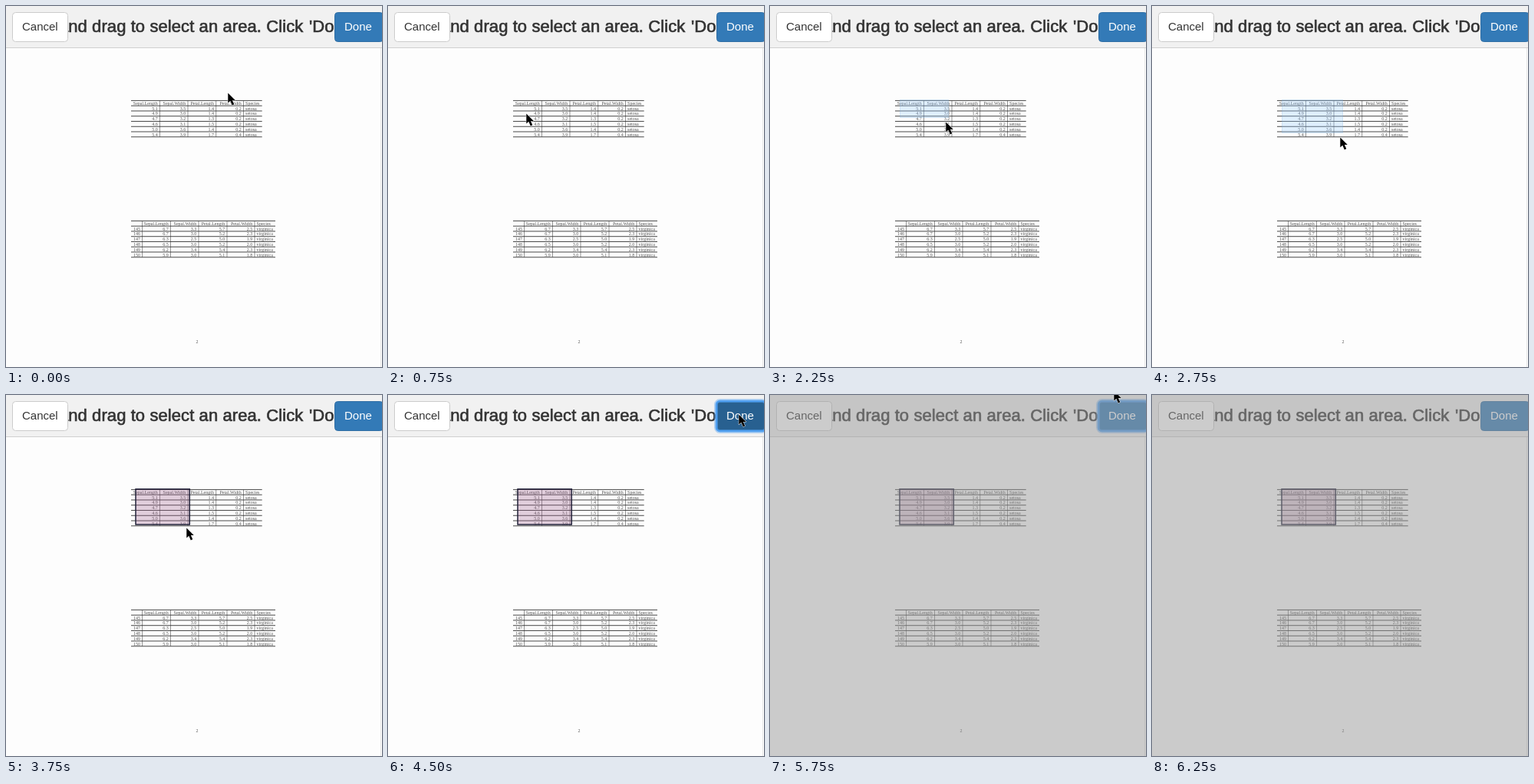
These frames come from a looping animation (490x471 px, 6.5 s). An HTML page:

```html
<!DOCTYPE html>
<html lang="en">
<head>
<meta charset="utf-8">
<title>Select an area</title>
<style>
  html, body { margin: 0; width: 100%; height: 100%; overflow: hidden; background: #fdfdfd; }
  svg { display: block; width: 490px; height: 471px; }
  text { font-family: "Liberation Sans", Arial, sans-serif; white-space: pre; }
  .title { font-size: 22px; letter-spacing: .09px; fill: #333; stroke: #333; stroke-width: .65px; }
  .label { font-size: 15px; }
  .table text, .page { font: 6px "Liberation Serif", Times, serif; fill: #555; }
  .table .rows { stroke: #333; stroke-width: .9; }
  .table .cols { stroke: #777; stroke-width: .8; }
  .drag { fill: #9cf; fill-opacity: .3; stroke: #6fa8d8; stroke-opacity: .25; }
  .picked { fill: #a06090; fill-opacity: .3; stroke: #22223a; stroke-width: 1.5; }
</style>
</head>
<body>
<svg id="stage" viewBox="0 0 490 471">
  <rect width="490" height="471" fill="#fdfdfd"/>
  <path d="M488.5 55V471" stroke="#e8e8e8"/>
  <g id="tables"></g>
  <text class="page" x="247.5" y="440">2</text>
  <rect id="area"/>

  <rect width="490" height="54" fill="#f1f1f1"/>
  <path d="M0 54.5H490" stroke="#d0d0d0"/>
  <text class="title" x="68.9" y="34">and drag to select an area. Click <tspan dx="1.3">'Done'</tspan></text>

  <rect x="8.5" y="8.5" width="72" height="38" rx="4" fill="#fff" stroke="#ccc"/>
  <text class="label" x="21" y="32" fill="#333">Cancel</text>

  <rect id="done" x="428.5" y="8.5" width="63" height="38" rx="4"/>
  <g id="glow" fill="none" stroke="#4f9ff0">
    <rect x="427.5" y="7.5" width="65" height="40" rx="5" stroke-width="5" opacity=".4"/>
    <rect x="428" y="8" width="64" height="39" rx="4.5" stroke-width="2.5"/>
  </g>
  <text class="label" x="441" y="32" fill="#fff">Done</text>

  <rect id="shade" width="490" height="471" fill="#999" opacity=".5"/>
  <g id="cursor">
    <path d="M.3 1.5V14.6L3.3 11.8L5.8 17.4L8.3 16.3L5.9 10.9H9.8Z"
          stroke="#fff" stroke-width="1" paint-order="stroke" stroke-linejoin="round"/>
  </g>
</svg>
<script>
const $ = id => document.getElementById(id);
const LOOP = 6500, STEP = 250;

const heads = ["Sepal.Length", "Sepal.Width", "Petal.Length", "Petal.Width"];
const setosa = ["5.1 3.5 1.4 0.2", "4.9 3.0 1.4 0.2", "4.7 3.2 1.3 0.2",
                "4.6 3.1 1.5 0.2", "5.0 3.6 1.4 0.2", "5.4 3.9 1.7 0.4"];
const virginica = ["6.7 3.3 5.7 2.5", "6.7 3.0 5.2 2.3", "6.3 2.5 5.0 1.9",
                   "6.5 3.0 5.2 2.0", "6.2 3.4 5.4 2.3", "5.9 3.0 5.1 1.8"];

function table(top, right, cols, species, data, firstId) {
  const pitch = 6.77, bottom = top + 7 * pitch;
  const cell = (x, row, s, anchor) =>
    `<text x="${x}" y="${top + row * pitch + 5.5}" text-anchor="${anchor}">${s}</text>`;
  const edges = cols.slice(-4);
  let rows = "", text = "";
  for (let i = 0; i < 8; i++) rows += `M163 ${top + i * pitch}H${right}`;
  const bars = cols.map(x => `M${x} ${top}V${bottom}`).join("");
  [heads, ...data.map(r => r.split(" "))].forEach((values, row) => {
    values.forEach((v, i) => text += cell(edges[i] - 2.8, row, v, "end"));
    text += cell(edges[3] + 2.6, row, row ? species : "Species", "start");
    if (firstId && row) text += cell(166, row, firstId + row - 1, "start");
  });
  return `<g class="table"><path class="cols" d="${bars}"/><path class="rows" d="${rows}"/>${text}</g>`;
}

$("tables").innerHTML =
  table(123.4, 333.7, [200.5, 237, 273.7, 309.5], "setosa", setosa) +
  table(280.4, 351, [177.5, 214.5, 251, 288, 324], "virginica", virginica, 145);

// Pointer tip at each step; the last place holds until the pointer leaves.
const path = [
  [289, 112], [206, 142], [195, 139], [180, 139], [172, 135], [168, 133], [168, 126],
  [167, 127], [164, 128], [229, 150], [244, 165], [245, 170], [236, 171], [235, 172],
  [235, 172], [235, 172], [475, 6], [457, 24]
];

function show(id, on) { $(id).setAttribute("visibility", on ? "visible" : "hidden"); }

function setArea(x, y, right, bottom, kind) {
  const box = { x, y, width: right - x, height: bottom - y, class: kind };
  for (const key in box) $("area").setAttribute(key, box[key]);
}

function draw(now) {
  const t = now % LOOP, step = Math.floor(t / STEP);
  const [x, y] = t >= 5750 ? [448, -7] : path[Math.min(step, path.length - 1)];
  $("cursor").setAttribute("transform", `translate(${x} ${y})`);
  show("cursor", t < 6000);

  show("area", t >= 2250);
  if (t >= 3750) setArea(169, 122.7, 239.3, 169, "picked");
  else if (t >= 2250) setArea(169.5, 122.5, x + 3.5, y - 4.5, "drag");

  const dark = t >= 4250 && t < 5750;
  $("done").setAttribute("fill", dark ? "#286090" : "#337ab7");
  $("done").setAttribute("stroke", dark ? "#204d74" : "#2e6da4");
  show("glow", t >= 4500 && t < 6250);
  show("shade", t >= 4750);
  requestAnimationFrame(draw);
}
draw(0);
</script>
</body>
</html>
```
